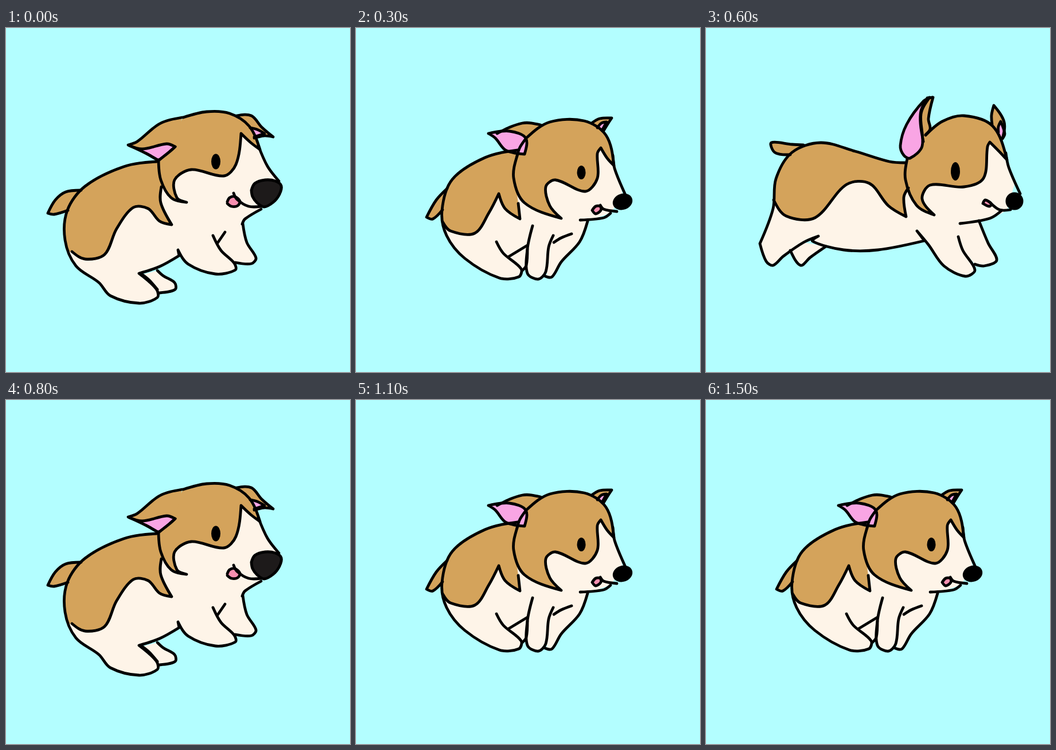
Animation of 600x600 px, one loop 1.6 s. Source, as an HTML page:

```html
<!DOCTYPE html>
<html lang="en">
<head>
<meta charset="utf-8">
<title>Running puppy</title>
<style>
  html, body { margin: 0; width: 100%; height: 100%; overflow: hidden; background: #b3feff; }
  svg { display: block; width: 100%; height: 100%; }
</style>
</head>
<body>
<svg id="stage" viewBox="0 0 600 600"></svg>
<script>
const NS = 'http://www.w3.org/2000/svg';
const STEP = 100;
const TAN = '#d4a35b', CREAM = '#fef4e8', PINK = '#f9a5e4', TONGUE = '#f88fb0', DARK = '#1d1a1a';
const stage = document.getElementById('stage');
const poses = [];
let fills, lines;

function add(parent, tag, attrs) {
  const node = document.createElementNS(NS, tag);
  for (const key in attrs) node.setAttribute(key, attrs[key]);
  return parent.appendChild(node);
}

// Smooth curve through a run of points, tangents weighted by spacing.
function spline(pts) {
  const dist = (p, q) => Math.hypot(q[0] - p[0], q[1] - p[1]) || 1;
  const mid = (p, q) => [(p[0] + q[0]) / 2, (p[1] + q[1]) / 2];
  const tangents = pts.map((p, i) => {
    const a = pts[i - 1], b = pts[i + 1];
    if (!a || !b) return null;
    const len = dist(a, p) + dist(p, b);
    return [(b[0] - a[0]) / len, (b[1] - a[1]) / len];
  });
  let d = '';
  for (let i = 0; i + 1 < pts.length; i++) {
    const p = pts[i], q = pts[i + 1], h = dist(p, q) / 3;
    const t = tangents[i], u = tangents[i + 1];
    let c1 = t && [p[0] + t[0] * h, p[1] + t[1] * h];
    let c2 = u && [q[0] - u[0] * h, q[1] - u[1] * h];
    c1 = c1 || mid(p, c2 || q);
    c2 = c2 || mid(q, c1);
    d += `C${c1} ${c2} ${q}`;
  }
  return d;
}

// "!" after a point makes it a corner.
function curve(text) {
  let run = [], d = '';
  for (const token of text.trim().split(/\s+/)) {
    const p = token.split(',').map(parseFloat);
    if (!d) d = `M${p}`;
    run.push(p);
    if (token.endsWith('!')) {
      d += spline(run);
      run = [p];
    }
  }
  return d + spline(run);
}

// All fills of a pose lie below all its lines.
function pose() {
  const group = add(stage, 'g', { visibility: 'hidden' });
  fills = add(group, 'g', {});
  lines = add(group, 'g', {
    fill: 'none', stroke: '#000', 'stroke-width': 4.8,
    'stroke-linecap': 'round', 'stroke-linejoin': 'round'
  });
  poses.push(group);
}

const line = text => add(lines, 'path', { d: curve(text) });

// Points after "~" are filled but not outlined.
function shape(fill, text, attrs) {
  line(text.split('~')[0]);
  return add(fills, 'path', { d: curve(text.replace(' ~', '!')), fill, ...attrs });
}

function body(text) {
  const id = 'body' + poses.length;
  const clip = add(stage, 'clipPath', { id });
  add(clip, 'path', { d: shape(CREAM, text).getAttribute('d') });
}

const patch = text => shape(TAN, text, { 'clip-path': `url(#body${poses.length})` });

const oval = (cx, cy, rx, ry, attrs) =>
  add(lines, 'ellipse', { cx, cy, rx, ry, fill: '#000', stroke: 'none', ...attrs });

function gather() {
  pose();
  shape(TAN, '131,283 104,286 86,300 73,323! 84,325 108,318 ~ 150,310');
  shape(CREAM, '264,423 274,432 294,444 295,456 268,462 ~ 238,430');
  shape(CREAM, '413,341 420,374 436,401 428,411 400,409');
  body('263,233 205,242 138,276 107,318 103,370 122,415 162,444 182,467 232,480 264,470 262,455 232,428! 268,416 302,397! 300,387! 318,412 365,429 400,422 398,410 375,388 361,362 ~ 388,405! 400,409! 415,358! 412,341! 447,312! 474,264! 456,241 440,198! 400,160!');
  patch('115,390 138,403 172,395 193,350 222,313 248,315 268,337 289,343! 270,305 271,277 ~ 270,225! 80,225! 80,390!');
  shape(TAN, '402,153 428,153 446,173 466,190! 450,188 433,192');
  shape(PINK, '426,174 438,177 451,184! 433,190 ~ 426,174');
  shape(TAN, '266,230 270,265 288,296 315,304! 298,296 294,265 323,247 380,258 401,238 410,184! 427,200 443,212! 424,171 390,149 350,146 309,156');
  line('440,205 456,241 476,267');
  shape(TAN, '307,156 268,167 229,198 213,204! 245,219 266,231! 285,216 295,207');
  shape(PINK, '215,205 238,211 280,202 295,207! 285,216 266,231! 245,219');
  shape(TONGUE, '386,303 390,296 399,294 408,302 404,310 393,311 386,306');
  line('397,288 403,299 423,311 446,311');
  line('445,316 417,333 412,342');
  line('369,375 382,356');
  line('235,428 250,440 264,456');
  shape(DARK, '428,283 434,271 452,265 470,267 480,275 477,290 466,304 450,312 438,305 430,294 428,283');
  oval(366, 233, 8, 13.5);
}

function reach() {
  pose();
  shape(TAN, '157,249 142,227 136,225 131,236 130,254 138,270');
  shape(CREAM, '127,380 111,395 118,410 150,402 175,398');
  shape(CREAM, '474,355 499,377 492,389 468,395 452,390');
  body('343,238 320,238 250,232 180,240 137,268 110,300 104,333! 92,347 50,368 41,385 50,407 70,404 110,380 150,384 205,405 270,411 330,391 356,376! 348,364! 380,390 435,411 457,407 450,392 413,355 ~ 432,380! 452,390! 465,392! 474,355! 492,347! 528,325! 533,272! 523,242 500,205! 475,175!');
  patch('106,318 122,350 155,363 205,352 255,305 297,265! 305,305 347,340! 339,315 343,280 ~ 345,225! 100,225! 100,318!');
  shape(TAN, '473,170 475,151 480,136! 500,158 519,203 508,215');
  shape(PINK, '500,200 496,180 498,157! 514,186 519,203 510,215');
  shape(TAN, '348,238 344,255 355,300 384,327! 370,290 386,275 432,298 472,278 489,208! 509,220 520,238! 485,185 440,165 394,174');
  line('518,232 526,250 539,278');
  shape(TAN, '399,173 350,163 305,161 290,172! 318,191 345,236! 383,215');
  shape(PINK, '317,189 360,194 383,215 368,236 343,233 328,213 317,189');
  shape(TONGUE, '481,325 487,318 503,327 484,331 481,325');
  line('488,315 514,331 535,322');
  line('448,352 470,353 492,347 514,331');
  line('425,371 446,360');
  oval(538, 298, 21.5, 21, { fill: DARK, stroke: '#000' });
  oval(435, 253, 8.5, 13.5);
}

function leap() {
  pose();
  shape(TAN, '170,204 150,203 114,200 120,217 147,221');
  shape(CREAM, '147,388 165,414 182,400 209,381 ~ 170,374');
  shape(CREAM, '476,336 492,375 507,405 485,415 469,412');
  body('349,235 320,233 260,215 200,200 150,217 122,263 117,315 94,376! 105,407 117,414 135,398 170,374 196,363! 186,372 240,387 300,387 381,371! 368,354! 388,378 415,415 452,433 469,422 448,388 440,364 ~ 448,388! 470,413! 482,352! 476,337! 512,325! 525,318! 538,273! 526,230 505,190! 480,165!');
  patch('118,300 140,328 190,331 245,273 285,271 318,310 349,329! 345,295 353,279 ~ 349,190! 100,190! 100,300!');
  shape(TAN, '499,168 498,152 502,135! 520,164 517,193');
  shape(PINK, '510,182 510,172 514,163! 521,184 517,193');
  shape(TAN, '351,228 348,265 367,309 398,326! 377,298 391,274 450,277 484,262 491,207 495,199! 512,216 525,230! 500,171 450,153 412,163 383,187');
  line('523,218 528,243 548,289');
  shape(TAN, '383,186! 391,176 388,158 396,121! 386,122! 374,150 379,198');
  shape(PINK, '395,121 380,127 350,168 339,205 345,222 356,227 377,206 375,150 390,121');
  shape(TONGUE, '483,306 487,300 498,307 494,311 483,306');
  line('495,304 512,317 531,317');
  line('443,341 495,332 516,318');
  oval(538, 302, 15.5, 15.5);
  oval(435, 250, 8, 16);
}

function tuck() {
  pose();
  shape(TAN, '159,280 140,300 123,330! 134,333 151,317');
  shape(CREAM, '404,337 390,373 358,408 342,434 330,433');
  body('282,213 225,226 168,264 150,318 158,362 190,402 250,436 284,434 288,420 257,393 245,373 ~ 264,400! 288,420! 297,422! 335,428! 400,355! 404,337! 445,322! 465,290! 450,230! 400,170!');
  shape(CREAM, '308,345 299,385 299,428 318,438 331,425 336,382 344,362');
  patch('151,338 165,354 207,358 232,322 249,289! 260,315 286,333! 283,306 ~ 277,260! 284,200! 130,200! 130,338!');
  shape(TAN, '411,166 425,158 446,157! 440,166 432,179');
  shape(PINK, '421,174 428,166 437,164! 429,179 ~ 421,174');
  shape(TAN, '322,169 290,166 246,184 ~ 297,208');
  shape(TAN, '281,223 275,262 294,305 358,332! 338,310 331,277 348,265 400,285 421,262 421,219 427,209! 438,227 450,240! 436,187 398,162 338,164 297,192');
  line('281,223 286,208 297,192');
  line('448,222 451,245 469,289');
  shape(PINK, '231,184! 268,180 296,192 294,220! 261,213 243,192 231,184');
  shape(TONGUE, '412,318 418,311 426,311 427,318 418,324 412,318');
  line('426,309 432,316 455,320');
  line('391,335 432,331 444,323');
  line('266,399 299,379');
  line('299,385 297,414 290,423');
  line('345,374 358,366 376,359');
  oval(465, 303, 17.5, 14, { transform: 'rotate(-18 465 303)' });
  oval(393, 252, 7.5, 12);
}

[gather, reach, leap, tuck].forEach(build => build());

function draw(time) {
  const now = Math.floor(time / STEP) % poses.length;
  poses.forEach((group, i) => group.setAttribute('visibility', i === now ? 'visible' : 'hidden'));
}

function tick() {
  draw(performance.now());
  requestAnimationFrame(tick);
}
tick();
</script>
</body>
</html>
```
